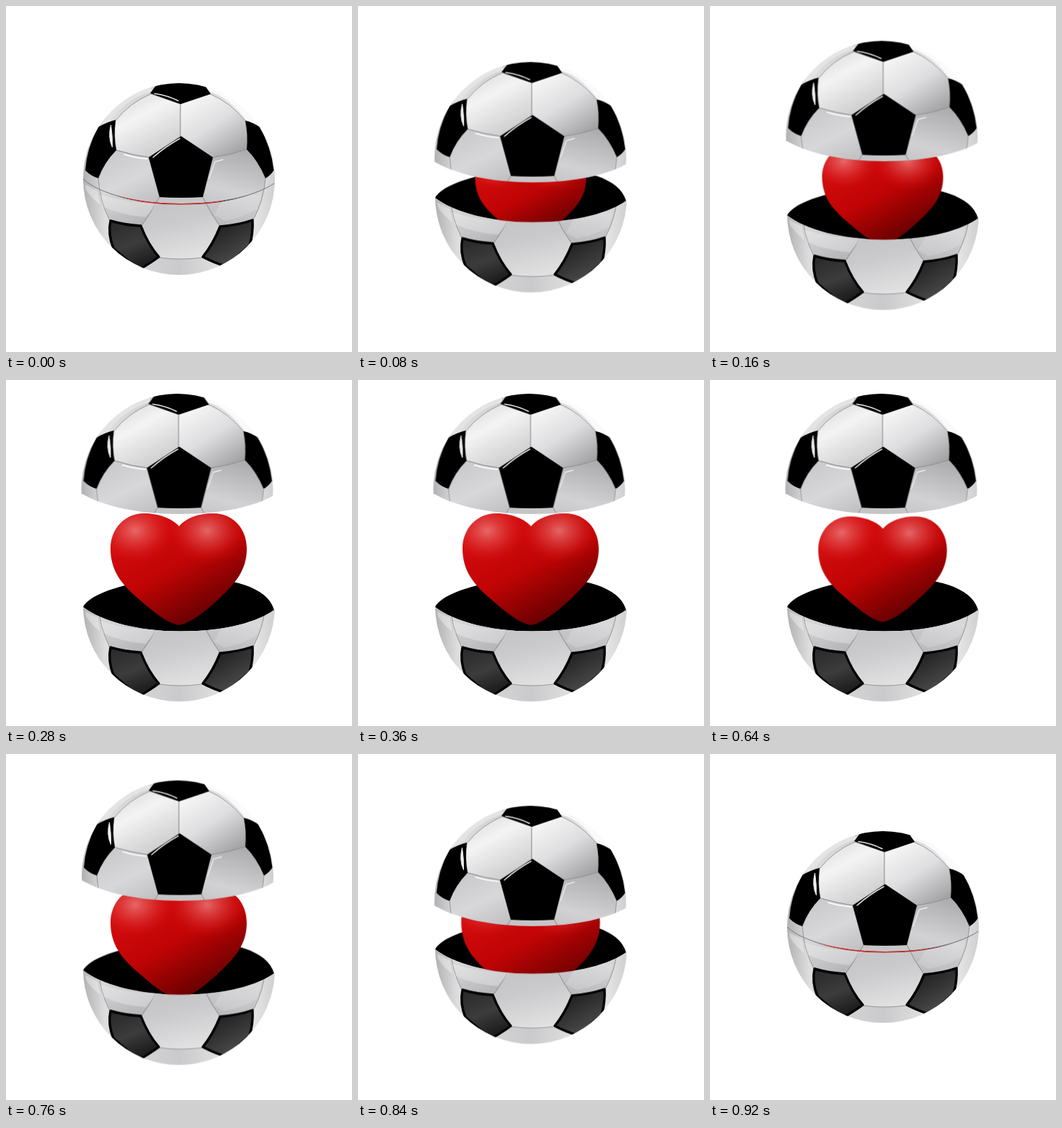
These frames come from a looping animation (480x480 px, 1000 ms). An HTML page:

```html
<!DOCTYPE html>
<html lang="en">
<head>
<meta charset="utf-8">
<title>Heart in a ball</title>
<style>
  html, body { margin: 0; width: 100%; height: 100%; overflow: hidden; background: #fff; }
  svg { display: block; width: 100%; height: 100%; }
  .top, .bottom, .heart, .seam { animation: 1s infinite; }
  .top { animation-name: lift; }
  .bottom { animation-name: drop; }
  .heart { animation-name: beat; transform-origin: 239.5px 262.5px; }
  .seam { animation-name: seam; animation-timing-function: step-end; }

  @keyframes lift {
    0% { transform: translate(0, 0); animation-timing-function: steps(6); }
    24%, 72% { transform: translate(-2.5px, -88px); animation-timing-function: steps(5); }
    92%, 100% { transform: translate(0, 0); }
  }
  @keyframes drop {
    0% { transform: translate(0, 0); animation-timing-function: steps(6); }
    24%, 72% { transform: translate(0, 73px); animation-timing-function: steps(5); }
    92%, 100% { transform: translate(0, 0); }
  }
  @keyframes beat {
    0% { transform: scale(.74); animation-timing-function: steps(7); }
    28% { transform: scale(1); animation-timing-function: steps(1); }
    32% { transform: scale(1.018); animation-timing-function: steps(6); }
    56% { transform: scale(.907); animation-timing-function: steps(6); }
    80%, 100% { transform: scale(1.018); }
  }
  @keyframes seam {
    0% { opacity: 1; }
    4% { opacity: 0; }
    92%, 100% { opacity: 1; }
  }
</style>
</head>
<body>
<svg viewBox="0 0 480 480">
  <defs>
    <linearGradient id="upL" x1=".2" y1="0" x2=".75" y2="1">
      <stop stop-color="#dcdcdd"/><stop offset=".35" stop-color="#f4f4f4"/><stop offset="1" stop-color="#c8c8ca"/>
    </linearGradient>
    <linearGradient id="upR" x1=".2" y1=".1" x2=".8" y2="1">
      <stop stop-color="#f4f4f4"/><stop offset=".45" stop-color="#dedee0"/><stop offset="1" stop-color="#a0a0a2"/>
    </linearGradient>
    <linearGradient id="midL" x1=".2" y1="0" x2=".6" y2="1">
      <stop stop-color="#c8c8ca"/><stop offset=".45" stop-color="#d8d8da"/><stop offset="1" stop-color="#b6b6b8"/>
    </linearGradient>
    <linearGradient id="midR" x1=".6" y1="0" x2=".4" y2="1">
      <stop stop-color="#acacae"/><stop offset=".55" stop-color="#d2d2d4"/><stop offset="1" stop-color="#bababc"/>
    </linearGradient>
    <linearGradient id="low" x1=".3" y1="0" x2=".6" y2="1">
      <stop stop-color="#c4c4c6"/><stop offset=".4" stop-color="#cacacc"/><stop offset="1" stop-color="#e2e2e3"/>
    </linearGradient>
    <linearGradient id="base" x1="0" y1="0" x2="1" y2="0">
      <stop stop-color="#b0b0b2"/><stop offset=".12" stop-color="#dededf"/>
      <stop offset=".5" stop-color="#cacacc"/><stop offset=".85" stop-color="#eee"/><stop offset="1" stop-color="#cecece"/>
    </linearGradient>
    <linearGradient id="darkL" x1=".2" y1="0" x2=".6" y2="1">
      <stop stop-color="#2a2a2a"/><stop offset=".5" stop-color="#3c3c3c"/><stop offset="1" stop-color="#181818"/>
    </linearGradient>
    <linearGradient id="darkR" x1=".2" y1="0" x2=".8" y2="1">
      <stop stop-color="#181818"/><stop offset="1" stop-color="#525252"/>
    </linearGradient>
    <linearGradient id="red" x1=".25" y1=".1" x2=".8" y2=".95">
      <stop stop-color="#d40c0e"/><stop offset=".45" stop-color="#c00405"/><stop offset="1" stop-color="#500"/>
    </linearGradient>
    <radialGradient id="glow">
      <stop stop-color="#f09090" stop-opacity=".7"/><stop offset=".45" stop-color="#e85a5a" stop-opacity=".4"/>
      <stop offset="1" stop-color="#d00" stop-opacity="0"/>
    </radialGradient>
    <linearGradient id="line" gradientUnits="userSpaceOnUse" x1="107" y1="0" x2="372" y2="0">
      <stop stop-color="#777"/><stop offset=".18" stop-color="#777"/>
      <stop offset=".24" stop-color="#c33"/><stop offset=".7" stop-color="#c44"/>
      <stop offset=".76" stop-color="#666"/><stop offset="1" stop-color="#777"/>
    </linearGradient>

    <clipPath id="round"><circle cx="240" cy="240" r="133"/></clipPath>
    <clipPath id="above"><path d="M100 100H380V249H372C350 262 306 274 243 274C185 274 138 263 108 246H100Z"/></clipPath>
    <clipPath id="below"><path d="M100 380H380V246H372C350 262 306 275.500 243 275.500C185 276 133 262 107 242H100Z"/></clipPath>
    <path id="lobes" d="M240 203C230 191 209 185 192 185C164 185 145 207 145 234C145 264 160 283 182 302C203 320 222 337 240 340C258 337 280 318 298 301C318 282 334 264 334 234C334 207 316 185 287 185C268 185 250 191 240 203Z"/>
    <clipPath id="heartClip"><use href="#lobes"/></clipPath>

    <g id="ball" clip-path="url(#round)">
      <rect x="106" y="106" width="268" height="268" fill="url(#base)"/>
      <path d="M278 118Q312 125 338 165L380 165V100H270Z" fill="#fafafa"/>
      <path d="M205 118Q165 128 140 165L120 160L190 100Z" fill="#e4e4e4"/>
      <g stroke="#909092" stroke-width=".9" stroke-linejoin="round">
        <path d="M201 122L242 136V181L198 210Q176 207 153 200Q149 180 152 159Q172 134 201 122Z" fill="url(#upL)"/>
        <path d="M283 122L242 136V181L287 210Q310 207 334 199Q336 178 332 159Q310 133 283 122Z" fill="url(#upR)"/>
        <path d="M153 200Q176 207 198 210L213 265Q200 288 188 305L144 298Q130 270 128 239Q136 217 153 200Z" fill="url(#midL)"/>
        <path d="M334 199Q310 207 287 210L273 265Q284 288 297 306L343 297Q358 268 360 239Q350 215 334 199Z" fill="url(#midR)"/>
        <path d="M213 265H273Q284 288 297 306Q287 331 272 349Q242 353 212 349Q197 331 188 305Q200 288 213 265Z" fill="url(#low)"/>
      </g>
      <path d="M131 262Q170 273 210 274L194 293Q160 290 136 279Z" fill="#fff" opacity=".28"/>
      <path d="M110 248L127 257L131 276Q119 267 111 255Z" fill="#fff" opacity=".35"/>
      <path d="M299 272Q330 268 356 255L349 281Q328 294 303 298L288 290Z" fill="#fff" opacity=".16"/>

      <path d="M200 121L209 109L240 100L275 109L284 122L242 136Z"/>
      <path d="M152 158Q140 161 128 168Q112 197 110 228Q118 236 128 239Q136 217 153 200Q149 180 152 158Z"/>
      <path d="M332 159Q342 161 352 168Q368 196 371.500 228Q367 235 360 239Q350 215 334 199Q336 178 332 159Z"/>
      <path d="M243 180.500L287 210L273 265Q243 267 213 265L198 210Z"/>
      <g stroke="#000" stroke-width="3.4" stroke-linejoin="round">
        <path d="M145 298Q165 304 187 305Q197 331 212 348Q200 357 184 366L149 336Q141 316 145 298Z" fill="url(#darkL)"/>
        <path d="M297 306Q322 304 342 297Q343 315 338 332L305 361Q288 356 273 348Q287 331 297 306Z" fill="url(#darkR)"/>
      </g>

      <g fill="none" stroke="#e0e0e0" stroke-linecap="round">
        <path d="M206 121.500Q224 124 239 131.500" stroke-width="1.500"/>
        <path d="M204 210Q221 195 241 184" stroke-width="1.600"/>
        <path d="M164 206Q180 211 196 212" stroke="#fff" stroke-width="1.500"/>
        <path d="M301 213L290 216L282 239" stroke="#ececec" stroke-width="1.300"/>
      </g>
      <path d="M145.500 165Q141 182 147.500 196Q148 182 145.500 165Z" fill="#eee" stroke="#eee"/>
    </g>
  </defs>

  <g class="bottom">
    <path d="M107 242C128 200 352 175 372 246C350 262 306 275.500 243 275.500C185 276 133 262 107 242Z"/>
  </g>
  <g class="heart">
    <use href="#lobes" fill="url(#red)"/>
    <g clip-path="url(#heartClip)">
      <ellipse cx="179" cy="209" rx="58" ry="48" fill="url(#glow)"/>
      <ellipse cx="279" cy="209" rx="58" ry="48" fill="url(#glow)"/>
    </g>
  </g>
  <g class="bottom"><g clip-path="url(#below)"><use href="#ball"/></g></g>
  <g class="top"><g clip-path="url(#above)"><use href="#ball"/></g></g>
  <path class="seam" d="M107 240C128 260 183 275 243 274.500C306 274.500 350 261 372 246" fill="none" stroke="url(#line)"/>
</svg>
</body>
</html>
```
